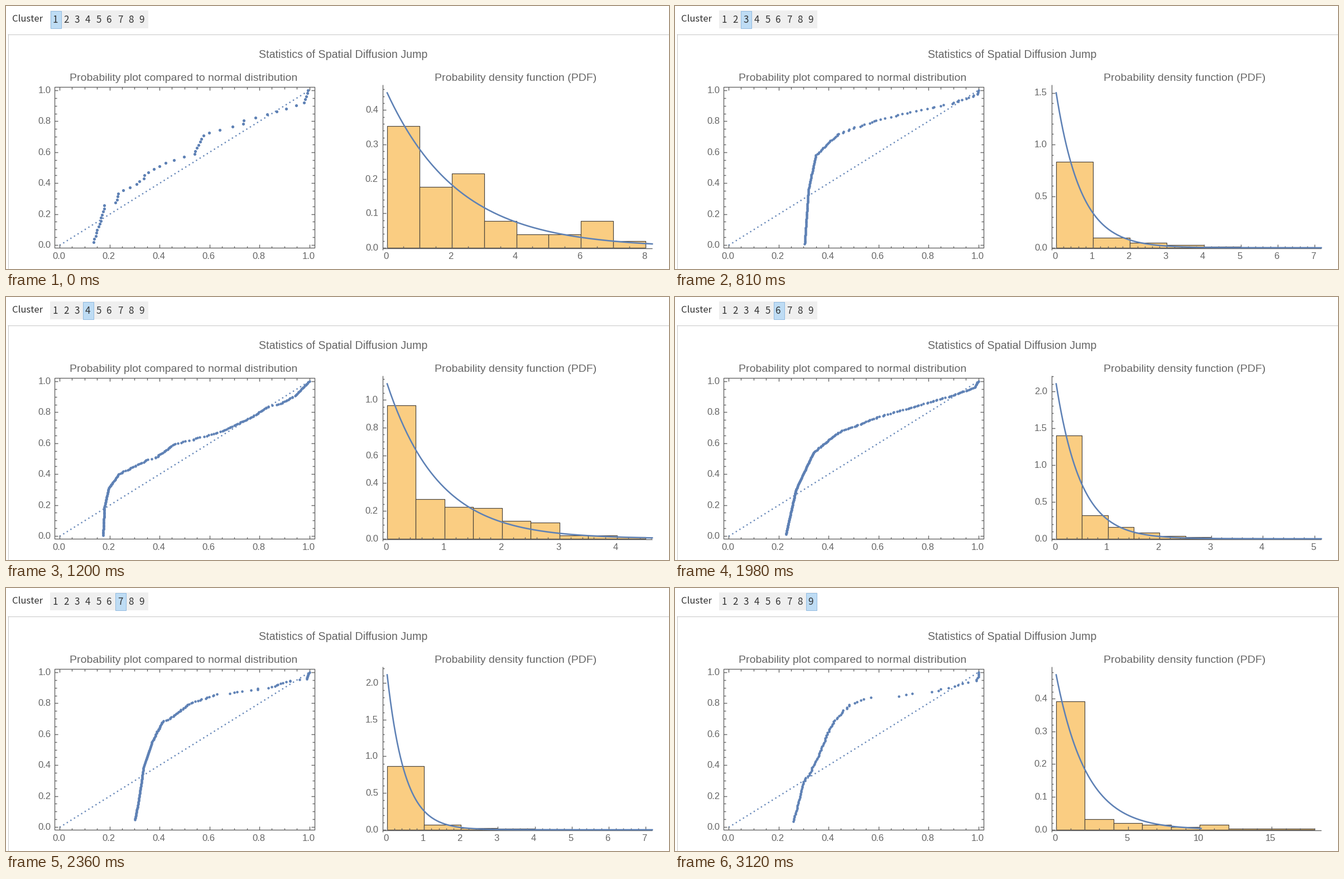
These frames come from a looping animation (1188 px wide and 471 px high, 3.5 s). A matplotlib script:

```python
import numpy as np
import matplotlib.pyplot as plt
from matplotlib.animation import FuncAnimation
from matplotlib.collections import LineCollection, PolyCollection
from matplotlib.patches import Rectangle

W, H, DPI = 1188, 471, 100
PX = 72 / DPI
STEP, LOOP = 10, 3500
STARTS = [0, 430, 810, 1200, 1580, 1980, 2360, 2740, 3120]
BLUE, ORANGE, EDGE = "#5e81b5", "#facd82", "#4b443b"
GRAY, INK = "#666666", "#333333"
SANS, UI = "Liberation Sans", "Noto Sans CJK JP"
CELL = 19.4                              # pitch of the cluster buttons
PX0, PY0, PW, PH = 96, 428, 447.5, 277   # unit square of the probability plot
X0, Y0, XEND, YTOP = 683, 433, 1158, 141  # density plot
BARS_W, PEAK = 463, 277.5                # histogram width, curve height

fig = plt.figure(figsize=(W / DPI, H / DPI), dpi=DPI, facecolor="white")
ax = fig.add_axes([0, 0, 1, 1])
ax.set_xlim(0, W)
ax.set_ylim(H, 0)
ax.axis("off")


def label(x, y, s, size=16.6, ha="left", color=GRAY, font=SANS):
    return ax.text(x, y, s, fontsize=size * PX, ha=ha, va="baseline",
                   color=color, family=font)


def strokes(segs, width=1.4, color=GRAY, z=3):
    return ax.add_collection(LineCollection(
        segs, colors=color, linewidths=width * PX, zorder=z))


def ticks(stop, major):
    """Tick values up to stop with their lengths; the long ones are major."""
    parts = 4 if f"{major:g}".endswith("2") else 5
    count = int(stop / major * parts + 1e-6)
    return [(i * major / parts, 3.5 if i % parts else 6) for i in range(count + 1)]


def nice_step(span):
    return next(s for s in (.05, .1, .2, .5, 1, 2, 5) if span / s <= 7.5)


def draw_static():
    strokes([[(3, 50.5), (W, 50.5)], [(3.5, 50), (3.5, H)],
             [(1187.5, 0), (1187.5, H)]], 1, "#c6c6c6", 0)
    label(11.5, 28, "Cluster", color=INK, font=UI)
    ax.add_patch(Rectangle((79, 8), 176, 32, color="#efefef", lw=0, zorder=0))
    for k in range(9):
        label(88.2 + CELL * k, 30, str(k + 1), 17, "center", INK, UI)
    label(604.5, 93, "Statistics of Spatial Diffusion Jump", 19.6, "center")
    label(318.5, 133.5, "Probability plot compared to normal distribution",
          19.5, "center")
    label(913, 133.5, "Probability density function (PDF)", 19.5, "center")

    l, r, t, b = 87, 552.5, 145, 433
    segs = [[(l, t), (r, t), (r, b), (l, b), (l, t)]]
    for v, n in ticks(1, 0.2):
        x, y = PX0 + PW * v, PY0 - PH * v
        segs += [[(x, b), (x, b - n)], [(x, t), (x, t + n)],
                 [(l, y), (l + n, y)], [(r, y), (r - n, y)]]
        if n == 6:
            label(80.5, y + 5, f"{v:.1f}", ha="right")
            label(x - 1.5, 453, f"{v:.1f}", ha="center")
    strokes(segs)
    ax.plot([PX0 + 1, PX0 + PW], [PY0, PY0 - PH], color=BLUE, lw=2.9 * PX,
            ls=(0, (0.01, 2.6)), dash_capstyle="round", alpha=0.9, zorder=2)


def quantiles(n, knots, seed):
    """Evenly ranked points along a path of percents, unevenly clumped."""
    kx, kp = np.array(knots) .T / 100
    p = np.arange(1, n + 1) / n
    p = p[p >= kp[0] - 0.5 / n]
    wob = np.random.default_rng(seed).normal(0, 0.4 / n, len(p))
    return PX0 + PW * np.interp(np.sort(p + wob), kp, kx), PY0 - PH * p


def tailed(n, *lead):
    """Bar heights that keep halving after the leading ones."""
    return [*lead, *(lead[-1] / 2 ** (i + 1) for i in range(n - len(lead)))]


scenes = []


def cluster(n, knots, rate, xmax, bars, dot=4.5, reach=None):
    k = len(scenes)
    arts = [ax.add_patch(Rectangle((79.5 + CELL * k, 8.5), 19, 31, fc="#bedcf4",
                                   ec="#93bbe0", lw=PX, zorder=1))]
    arts += ax.plot(*quantiles(n, knots, k), "o", color=BLUE, ms=dot * PX,
                    mew=0, zorder=4)

    sx, sy, w = BARS_W / xmax, PEAK / rate, BARS_W / len(bars)
    boxes = []
    for i, h in enumerate(bars):
        a, b, top = X0 + w * i, X0 + w * (i + 1), Y0 - sy * h
        boxes.append([(a, Y0), (a, top), (b, top), (b, Y0)])
    arts.append(ax.add_collection(PolyCollection(
        boxes, facecolors=ORANGE, edgecolors=EDGE, linewidths=1.2 * PX, zorder=2)))

    left = 674.5
    segs = [[(left, YTOP), (left, 437)], [(left, Y0 + .5), (XEND, Y0 + .5)]]
    xspan, yspan = (XEND - X0) / sx, (Y0 - YTOP) / sy
    for v, size in ticks(xspan, nice_step(xspan)):
        x = X0 + sx * v
        segs.append([(x, Y0), (x, Y0 - size)])
        if size == 6:
            arts.append(label(x - 2, 453, f"{v:.0f}", ha="center"))
    for v, size in ticks(yspan, nice_step(yspan)):
        y = Y0 - sy * v
        segs.append([(left, y), (left + size, y)])
        if size == 6:
            arts.append(label(667, y + 5, f"{v:.1f}", ha="right"))
    arts.append(strokes(segs))

    v = np.linspace(0, reach or xspan, 160)
    arts += ax.plot(X0 + sx * v, Y0 - PEAK * np.exp(-rate * v), color=BLUE,
                    lw=2.6 * PX, zorder=5)
    scenes.append(arts)


draw_static()

cluster(51, [(13.6, 2), (18.3, 25.5), (22.8, 27.5), (23.6, 33.4), (32.2, 41.2),
             (36.4, 49), (54, 58.8), (57.2, 70.6), (75.3, 80.4), (75.5, 82.4),
             (97.3, 91), (99.4, 100)],
        0.45, 8, np.array([18, 9, 11, 4, 2, 2, 4, 1]) / 51, 5.2)

cluster(107, [(30.8, 1), (31.7, 34), (33, 55), (34, 61), (41.8, 74),
              (47.4, 77.6), (65, 83), (77.5, 88), (94, 92.4), (99.2, 93),
              (100, 100)],
        1.203, 8, [.8, .075, .03, .02, .03, .02, .008, .02])

cluster(150, [(30.5, 1), (32, 36), (35, 58), (44, 72), (60, 81), (90, 92),
              (99.5, 97), (100, 100)],
        1.5, 7, tailed(7, .83, .1))

cluster(230, [(17.4, 0), (18, 19), (19.7, 31), (23.8, 40), (35.3, 49.5),
              (38.2, 50.2), (45.6, 59.2), (52.3, 62), (64.8, 67.5), (77, 77),
              (83.6, 83.8), (87.4, 84.8), (94.3, 90.6), (100, 100)],
        1.115, 4.5, tailed(9, .96, .285, .23, .22, .13, .115, .025, .025))

cluster(420, [(20.5, .4), (23.9, 17.3), (27.9, 38), (33.3, 51.6), (38.9, 59.2),
              (42.9, 61), (55.6, 71.8), (63, 76.5), (64.4, 76.6), (90.7, 90.6),
              (99.9, 98.2), (100, 100)],
        2.83, 4, tailed(8, 1.52, .315, .115, .03), 4.2)

cluster(260, [(23, 1), (27, 30), (34, 54), (44, 67), (60, 77), (90, 91),
              (98.5, 96), (100, 100)],
        2.1, 5, tailed(10, 1.4, .32))

cluster(190, [(30.2, 4.7), (31.5, 15.5), (33.7, 39), (37.1, 55.2), (41.3, 68.2),
              (44.5, 70.4), (51.6, 79.4), (63, 86), (68.6, 86.5), (84.7, 90.3),
              (92.5, 95), (98.8, 95.5), (100, 100)],
        2.11, 7, tailed(7, .87, .07, .025))

cluster(110, [(22, 1), (27, 30), (35, 52), (48, 66), (62, 77), (82, 86),
              (97, 94), (100, 100)],
        0.9, 4.5, tailed(9, .78, .36, .24, .27))

cluster(110, [(26, 3.6), (30.2, 30), (32, 33), (36, 46), (39.6, 60.6),
              (42.2, 68.6), (49, 80), (57, 83.8), (70.6, 84.5), (71.3, 85.6),
              (79.3, 86.2), (99.4, 95), (100, 97), (100, 100)],
        0.472, 18, [.392, .033, .02, .015, .008, .015, .003, .003, .003],
        reach=10.1)


def update(i):
    now = np.searchsorted(STARTS, i * STEP, side="right") - 1
    for k, arts in enumerate(scenes):
        for a in arts:
            a.set_visible(k == now)
    return []


update(0)
anim = FuncAnimation(fig, update, frames=LOOP // STEP, init_func=lambda: update(0),
                     interval=STEP, repeat=True, repeat_delay=0, blit=False)
plt.show()
```
